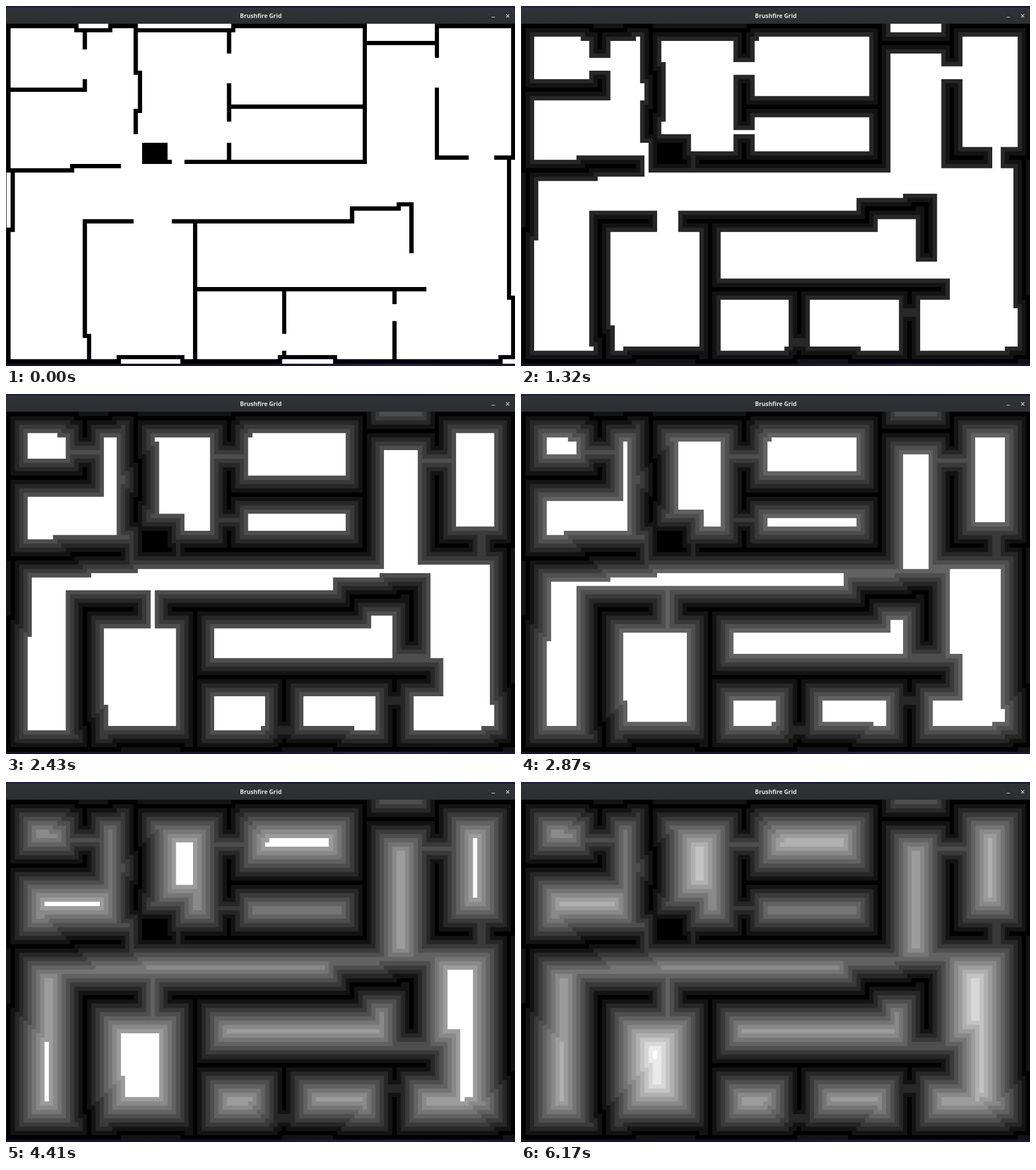
Recreate the animation shown at these times as an HTML page with a canvas. Size 890 by 629 pixels, loop 8600 ms.

```html
<!DOCTYPE html>
<html lang="en">
<head>
<meta charset="utf-8">
<title>Brushfire Grid</title>
<style>
  html, body { margin: 0; width: 100%; height: 100%; overflow: hidden; background: #14132f; }
  canvas { display: block; }
</style>
</head>
<body>
<canvas id="stage" width="890" height="629"></canvas>
<script>
const ctx = document.getElementById('stage').getContext('2d');
const COLS = 120, ROWS = 80, CELL = 10;
const SCALE = 890 / (COLS * CELL), LEFT = 0.67, TOP = 31.3;
const LOOP = 8600, TICK = 220;

// Ticks at which the fire spreads by one more cell
const SPREAD_TICKS = [3, 6, 8, 11, 13, 16, 17, 20, 22, 24, 26, 28];

// Distance to the nearest wall: 0 in walls, Infinity until reached
const distance = Array.from({ length: ROWS }, () => Array(COLS).fill(Infinity));

function fill(x0, y0, x1, y1, value) {
  for (let y = Math.max(y0, 0); y < Math.min(y1, ROWS); y++) {
    for (let x = Math.max(x0, 0); x < Math.min(x1, COLS); x++) distance[y][x] = value;
  }
}

// A wall one cell thick through the given corners
function wall(...corners) {
  for (let i = 1; i < corners.length; i++) {
    const [ax, ay] = corners[i - 1], [bx, by] = corners[i];
    fill(Math.min(ax, bx), Math.min(ay, by), Math.max(ax, bx) + 1, Math.max(ay, by) + 1, 0);
  }
}

const doorAcross = (row, from, to) => fill(from, row, to, row + 1, Infinity);
const doorDown = (col, from, to) => fill(col, from, col + 1, to, Infinity);

// A window opens the outer wall and sets a longer sill inside it
function windowAcross(row, from, to, sill) {
  doorAcross(row, from, to);
  wall([from - 1, sill], [to, sill]);
}

function windowDown(col, from, to, sill) {
  doorDown(col, from, to);
  wall([sill, from - 1], [sill, to]);
}

function buildHouse() {
  const right = COLS - 1, bottom = ROWS - 1;
  wall([0, 0], [right, 0], [right, bottom], [0, bottom], [0, 0]);

  // Upper rooms
  wall([18, 0], [18, 15], [0, 15]);
  wall([30, 0], [30, 11], [31, 11], [31, 20], [30, 20], [30, 25]);
  wall([0, 34], [15, 34], [15, 33], [26, 33]);
  wall([32, 32], [84, 32], [84, 0]);
  wall([52, 0], [52, 32]);
  wall([52, 19], [84, 19]);
  wall([101, 0], [101, 31], [right, 31]);
  fill(32, 28, 38, 33, 0);
  doorDown(18, 6, 13);
  doorDown(52, 7, 14);
  doorDown(52, 23, 28);
  doorDown(101, 8, 15);
  doorAcross(32, 39, 42);
  doorAcross(31, 109, 115);

  // Lower rooms
  wall([19, bottom], [19, 73], [18, 73], [18, 46], [81, 46], [81, 43], [92, 43], [92, 42], [95, 42], [95, 53]);
  wall([44, 46], [44, bottom]);
  wall([44, 62], [98, 62]);
  wall([65, 62], [65, bottom]);
  wall([91, 62], [91, bottom]);
  doorAcross(46, 30, 39);
  doorDown(65, 73, 77);
  doorDown(91, 66, 70);

  windowAcross(0, 17, 24, 1);
  windowAcross(0, 31, 53, 1);
  windowAcross(0, 85, 101, 4);
  windowAcross(bottom, 27, 41, bottom - 1);
  windowAcross(bottom, 65, 77, bottom - 1);
  windowAcross(bottom, 117, COLS, bottom - 1);
  windowDown(0, 35, 48, 1);
  windowDown(right, 32, 64, right - 1);
}

// Each wave claims the free neighbours of the last one; returns the farthest distance
function burn() {
  let front = [];
  distance.forEach((row, y) => row.forEach((d, x) => { if (d === 0) front.push([x, y]); }));
  for (let wave = 1; ; wave++) {
    const next = [];
    for (const [cx, cy] of front) {
      for (let y = cy - 1; y <= cy + 1; y++) {
        for (let x = cx - 1; x <= cx + 1; x++) {
          if (distance[y]?.[x] !== Infinity) continue;
          distance[y][x] = wave;
          next.push([x, y]);
        }
      }
    }
    if (!next.length) return wave - 1;
    front = next;
  }
}

function gradient(x1, y1, ...colors) {
  const g = ctx.createLinearGradient(0, 0, x1, y1);
  colors.forEach((color, i) => g.addColorStop(i / (colors.length - 1), color));
  return g;
}

function drawWindow() {
  ctx.fillStyle = gradient(890, 0, '#1d2050', '#17183f', '#1b1a48', '#17163c', '#191744');
  ctx.fillRect(0, 0, 890, 5);
  ctx.fillStyle = gradient(890, 0, '#11122a', '#14142f', '#15132f', '#2a2050', '#191638');
  ctx.fillRect(0, 624, 890, 5);

  ctx.fillStyle = '#1c1f22';
  ctx.fillRect(0, 30, 890, 595);
  ctx.fillStyle = gradient(0, 31, '#303436', '#2b2f31');
  ctx.beginPath();
  ctx.roundRect(0, 3, 890, 28, [5, 5, 0, 0]);
  ctx.fill();

  ctx.fillStyle = '#e4e4e2';
  ctx.font = 'bold 10.4px "Open Sans", sans-serif';
  ctx.textAlign = 'center';
  ctx.fillText('Brushfire Grid', 445.5, 21);
  ctx.strokeStyle = '#d0d1d1';
  ctx.lineWidth = 1.1;
  ctx.stroke(new Path2D('M849 19.5h6 M874.5 14.5l5.5 5.5 M880 14.5l-5.5 5.5'));
}

// The grid is painted at full size, then scaled down so that its edges are smooth
const grid = document.createElement('canvas');
grid.width = COLS * CELL;
grid.height = ROWS * CELL;
const gridCtx = grid.getContext('2d');

function drawGrid(reached) {
  distance.forEach((row, y) => row.forEach((d, x) => {
    const shade = d > reached ? 255 : Math.floor(255 * d / farthest);
    gridCtx.fillStyle = `rgb(${shade}, ${shade}, ${shade})`;
    gridCtx.fillRect(x * CELL, y * CELL, CELL, CELL);
  }));
  drawWindow();
  ctx.imageSmoothingQuality = 'high';
  ctx.drawImage(grid, LEFT, TOP, grid.width * SCALE, grid.height * SCALE);
}

let start, shown;
function frame(now) {
  start ??= now;
  const time = (now - start) % LOOP;
  const reached = SPREAD_TICKS.filter(tick => tick * TICK <= time).length;
  if (reached !== shown) drawGrid(shown = reached);
  requestAnimationFrame(frame);
}

buildHouse();
const farthest = burn();
drawGrid(0);
requestAnimationFrame(frame);
</script>
</body>
</html>
```
